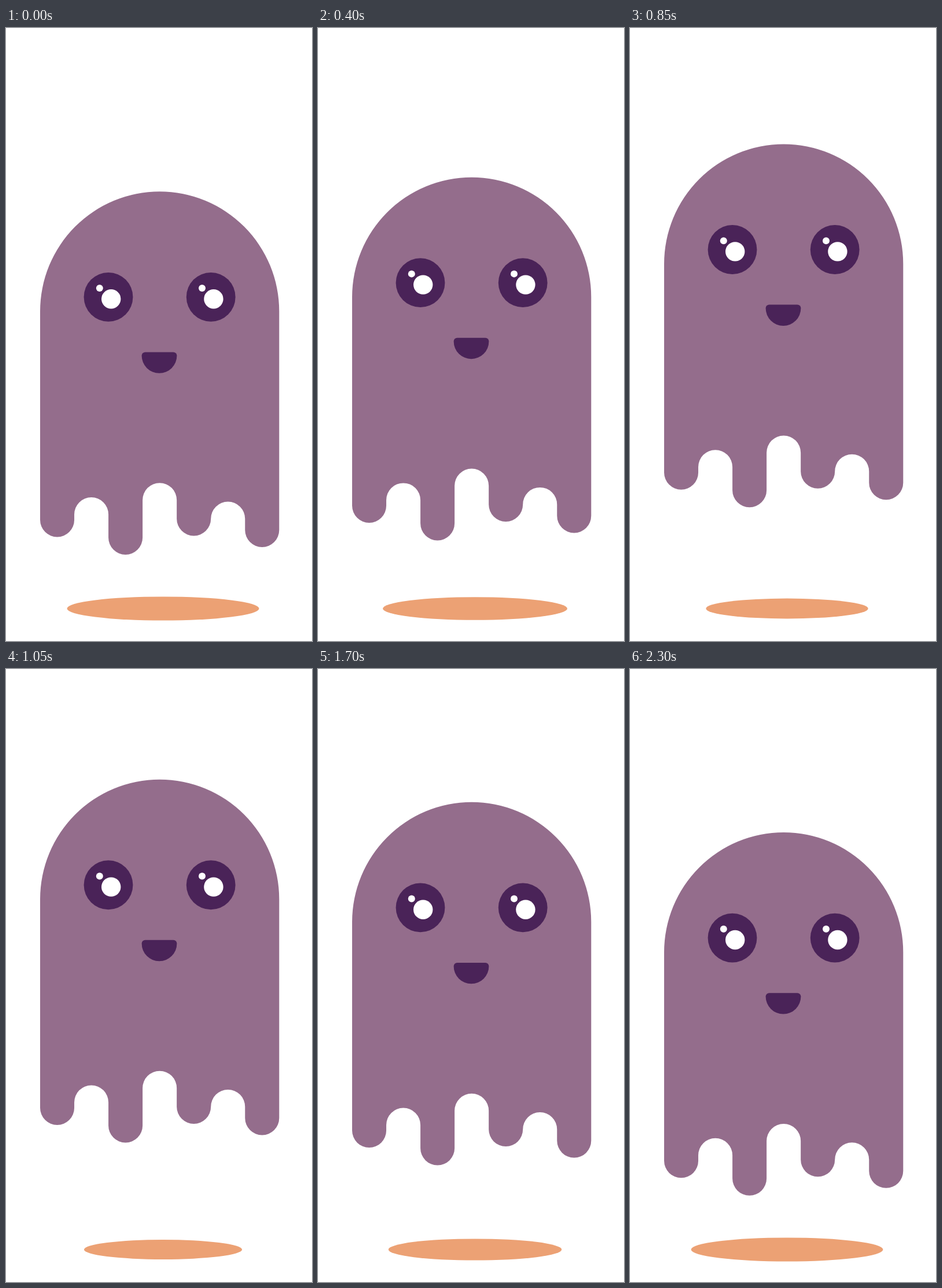
Write an HTML page with a canvas that moves like this. It is 529 px wide and 1058 px high and loops after 2.35 s.

```html
<!DOCTYPE html>
<html lang="en">
<head>
<meta charset="utf-8">
<title>Floating ghost</title>
<style>
html, body { margin: 0; width: 100%; height: 100%; overflow: hidden; background: #fff; }
canvas { display: block; width: 529px; height: 1058px; }
</style>
</head>
<body>
<canvas id="stage" width="529" height="1058"></canvas>
<script>
const ctx = document.getElementById('stage').getContext('2d');
const LOOP = 2350, HALF = LOOP / 2, STEP = 50;
const BODY = '#946d8c', DARK = '#4a2358', GLOW = '#eca174', WHITE = '#fff';

// Cubic Bézier easing with handles (a, 0) and (b, 1).
function ease(u, a, b) {
  let lo = 0, hi = 1;
  for (let i = 0; i < 30; i++) {
    const s = (lo + hi) / 2, r = 1 - s;
    if (3 * a * s * r * r + 3 * b * s * s * r + s * s * s < u) lo = s;
    else hi = s;
  }
  return lo * lo * (3 - 2 * lo);
}

function swing(t, up, down) {
  return t < HALF ? ease(t / HALF, ...up) : 1 - ease((t - HALF) / HALF, ...down);
}

function oval(x, y, rx, ry, color) {
  ctx.fillStyle = color;
  ctx.beginPath();
  ctx.ellipse(x, y, rx, ry, 0, 0, Math.PI * 2);
  ctx.fill();
}

function body() {
  const left = 59, w = 59.04, r = w / 2, R = w * 3.5;
  // Alternating leg bottoms and gap tops, left to right.
  const ends = [878.5, 810, 909, 785.2, 876.5, 817.5, 896];
  ctx.fillStyle = BODY;
  ctx.beginPath();
  ctx.arc(left + R, 282.3 + R, R, Math.PI, 0);
  for (let i = 6; i >= 0; i--) {
    const gap = i % 2 === 1;
    const y = ends[i] + (gap ? r : -r);
    ctx.arc(left + w * (i + 0.5), y, r, 0, Math.PI, gap);
  }
  ctx.closePath();
  ctx.fill();
}

function eye(x) {
  oval(x, 464.3, 42.4, 42.4, DARK);
  oval(x + 4.7, 467.7, 16.7, 16.7, WHITE);
  oval(x - 15.2, 449, 6, 6, WHITE);
}

function mouth() {
  const x = 265, y = 565.4, r = 30.4, c = 6, top = y - c;
  ctx.fillStyle = DARK;
  ctx.beginPath();
  ctx.arc(x, y, r, 0, Math.PI);
  ctx.arcTo(x - r, top, x, top, c);
  ctx.arcTo(x + r, top, x + r, y, c);
  ctx.closePath();
  ctx.fill();
}

function draw(t) {
  const lift = 93 * swing(t, [0.43, 0.49], [0.49, 0.45]);
  const size = 1 - 0.18 * swing(t, [0.49, 0.51], [0.5, 0.41]);
  ctx.fillStyle = WHITE;
  ctx.fillRect(0, 0, 529, 1058);
  oval(271.5, 1002, 166 * size, 20.6 * size, GLOW);
  ctx.save();
  ctx.translate(0, -lift);
  body();
  eye(177);
  eye(354.2);
  mouth();
  ctx.restore();
}

const start = performance.now();
function tick() {
  const t = (performance.now() - start) % LOOP;
  draw(Math.floor(t / STEP) * STEP);
  requestAnimationFrame(tick);
}
tick();
</script>
</body>
</html>
```
